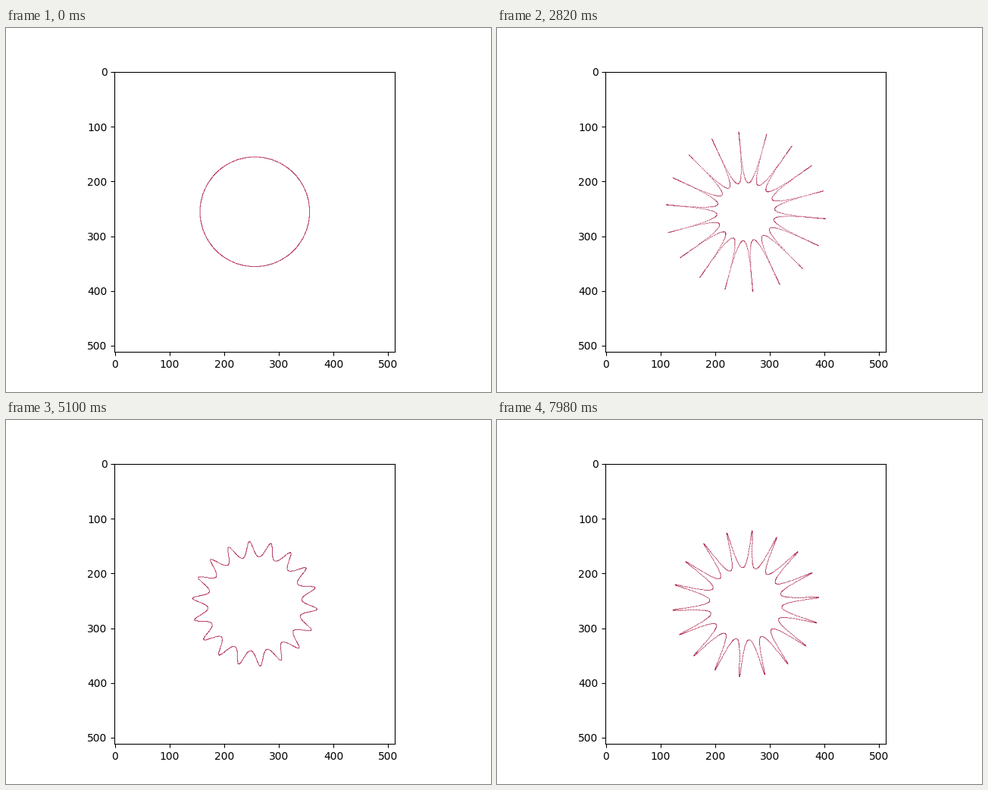
Recreate the animation shown at these times as a matplotlib script. Size 640 by 480 pixels, loop 8000 ms.

```python
import numpy as np
import matplotlib.pyplot as plt
from matplotlib.animation import FuncAnimation

SIZE = 512
CENTER = 256
RADIUS = 100
LOBES = 18
SWAY = 0.18     # sideways share of the wave, pinches the outer tips
POINTS = 3000
FRAMES = 267
LOOP_MS = 8000
STEP = 0.5      # change of wave height per frame
TURN = 99       # frame at which the wave starts to shrink
INK = (160, 0, 45)

theta = np.linspace(0, 2 * np.pi, POINTS, endpoint=False)
cos, sin = np.cos(theta), np.sin(theta)
radial = np.sin(LOBES * theta)
tangent = SWAY * np.cos(LOBES * theta)


def height(i):
    """Wave height: grows evenly, then shrinks through zero and inverts."""
    return STEP * (i if i <= TURN else 2 * TURN - i)


def picture(i):
    img = np.full((SIZE, SIZE, 3), 255, dtype=np.uint8)
    r = RADIUS + height(i) * radial
    t = height(i) * tangent
    x = np.rint(CENTER + r * cos - t * sin).astype(int)
    y = np.rint(CENTER + r * sin + t * cos).astype(int)
    img[y, x] = INK
    return img


plt.rcParams["font.family"] = "DejaVu Sans"
fig, ax = plt.subplots(figsize=(6.4, 4.8), dpi=100)
image = ax.imshow(picture(0))


def update(i):
    image.set_data(picture(i))
    return (image,)


anim = FuncAnimation(fig, update, frames=FRAMES, interval=LOOP_MS / FRAMES,
                     repeat=True, repeat_delay=0, blit=False)
plt.show()
```
